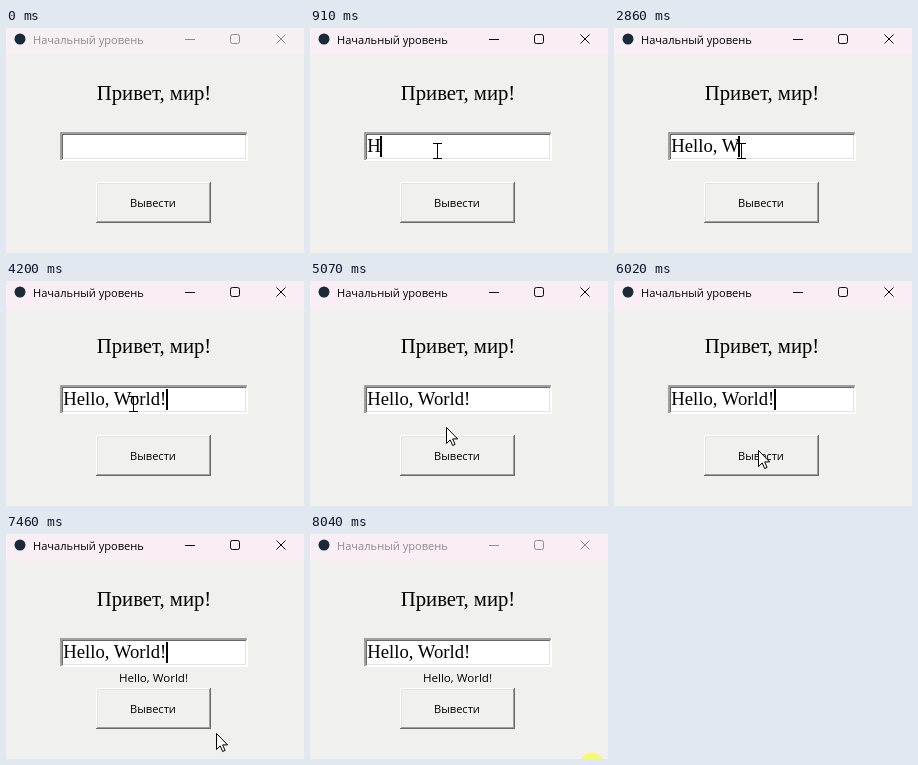
An HTML page for the animation above (8.12 s loop, 298 px wide and 225 px high).

```html
<!DOCTYPE html>
<html lang="ru">
<head>
<meta charset="utf-8">
<title>Начальный уровень</title>
<style>
  html, body { margin: 0; width: 100%; height: 100%; overflow: hidden; background: #f0f0ef; }
  svg { display: block; width: 298px; height: 225px; }
  .ui { font: 11.1px "Open Sans", "Noto Sans", sans-serif; }
  .serif { font-family: "Liberation Serif", "Noto Serif", serif; white-space: pre; }
  .line { fill: none; stroke: currentColor; }
  .crisp { shape-rendering: crispEdges; }
  #output { font-size: 11.6px; }
  #bar { color: #000; }
  #bar.idle { color: #8f8a8d; }
  #button .up, #button.down .sunk { visibility: visible; }
  #button .sunk, #button.down .up { visibility: hidden; }
  #button.down text { transform: translate(1px, 1px); }
</style>
</head>
<body>
<svg viewBox="0 0 298 225">
  <rect width="298" height="225" fill="#f0f0ef"/>

  <g id="bar">
    <rect id="barFill" width="298" height="27" fill="#f9eef4"/>
    <circle cx="14" cy="11" r="5.5" fill="#1b2a3a"/>
    <text class="ui" x="27" y="16" fill="currentColor">Начальный уровень</text>
    <path class="line crisp" d="M179 11.5h10"/>
    <rect class="line" x="224.5" y="6.5" width="9" height="9" rx="2"/>
    <path class="line" d="M270.5 6.5l9 9m0-9l-9 9"/>
  </g>

  <text class="serif" x="148" y="72" font-size="20.7" text-anchor="middle">Привет, мир!</text>

  <g class="crisp">
    <rect x="54" y="104" width="188" height="29" fill="#fff"/>
    <path d="M54 104h187v2H56v26h-2z" fill="#a0a0a0"/>
    <path d="M56 106h184v1H57v24h-1z" fill="#696969"/>
    <path d="M239 107h1v24H57v-1h182z" fill="#e3e3e3"/>
  </g>
  <text id="typed" class="serif" x="57.3" y="124" font-size="18.7"></text>
  <rect id="caret" class="crisp" y="108" width="2" height="21"/>

  <text id="output" class="ui" x="147.5" y="148" text-anchor="middle">Hello, World!</text>

  <g id="button">
    <g class="up crisp">
      <path d="M90 154h115v1H91v40h-1z" fill="#fff"/>
      <path d="M91 155h113v1H92v38h-1z" fill="#e3e3e3"/>
      <path d="M204 154h1v41H90v-1h114z" fill="#696969"/>
      <path d="M203 155h1v39H91v-1h112z" fill="#a0a0a0"/>
    </g>
    <g class="sunk crisp">
      <path d="M90 154h115v1H91v40h-1z" fill="#a0a0a0"/>
      <path d="M91 155h113v1H92v38h-1z" fill="#696969"/>
      <path d="M204 154h1v41H90v-1h114z" fill="#fff"/>
    </g>
    <text class="ui" x="147" y="179" text-anchor="middle">Вывести</text>
  </g>

  <g id="pointer">
    <circle id="press" r="13" fill="#ff0" fill-opacity=".6"/>
    <path id="beam" class="line crisp" d="M-4 -7.5h9M.5 -7v14M-4 7.5h9"/>
    <path id="arrow" d="M.5 .5v16l3.7-3.6 2.5 5.6 2.4-1.1-2.5-5.5h5z" fill="#fff" stroke="#000"/>
  </g>
</svg>

<script>
const LOOP = 8120;
const PHRASE = 'Hello, World!';
const KEYS = [910, 1110, 1410, 1610, 1870, 2150, 2580, 2860, 3160, 3350, 3530, 3650, 4200];
const STOPS = [57, 70, 78, 82, 86, 96, 101, 106, 124, 133, 140, 145, 154, 160];
// caret toggles, first one switches it on
const BLINKS = [600, 1160, 1500, 2120, 2400, 3000, 3320, 3900, 4200, 4800, 5100,
                5690, 6020, 6600, 6950, 7550, 7830, 7990];
const PRESSES = [[600, 780], [6100, 6270], [7990, LOOP]];
const OUT = [282, 232], FIELD = [127, 123], BUTTON = [144, 169];
const MOVES = [
  { start: 40, end: 600, step: 46, from: OUT, to: FIELD },
  { start: 4750, end: 5390, step: 46, from: FIELD, to: BUTTON },
  { start: 7110, end: 7850, step: 40, from: BUTTON, to: OUT }
];

const el = id => document.getElementById(id);
const show = (id, on) => el(id).setAttribute('visibility', on ? 'visible' : 'hidden');
const passed = (times, t) => times.filter(x => x <= t).length;
const ease = p => p * p * (3 - 2 * p);

function pointerAt(t) {
  let pos = OUT;
  for (const m of MOVES) {
    if (t < m.start) break;
    const held = (Math.floor((t - m.start) / m.step) + 1) * m.step;
    const p = ease(Math.min(1, held / (m.end - m.start)));
    pos = m.from.map((a, i) => Math.round(a + (m.to[i] - a) * p));
  }
  return pos;
}

function draw(t) {
  const count = passed(KEYS, t);
  el('typed').textContent = PHRASE.slice(0, count);
  el('caret').setAttribute('x', STOPS[count]);
  show('caret', passed(BLINKS, t) % 2);
  show('output', t >= 6270);

  el('bar').classList.toggle('idle', t < 600 || t >= 8040);
  el('barFill').setAttribute('fill', t < 600 ? '#f6f0f3' : '#f9eef4');
  el('button').classList.toggle('down', t >= 6100 && t < 6270);

  const [x, y] = pointerAt(t);
  const inField = x >= 54 && x < 242 && y >= 104 && y < 133;
  el('pointer').setAttribute('transform', `translate(${x} ${y})`);
  show('beam', inField);
  show('arrow', !inField);
  show('press', PRESSES.some(([a, b]) => t >= a && t < b));
}

const begin = performance.now();
function tick() {
  draw((performance.now() - begin) % LOOP);
  requestAnimationFrame(tick);
}
draw(0);
requestAnimationFrame(tick);
</script>
</body>
</html>
```
